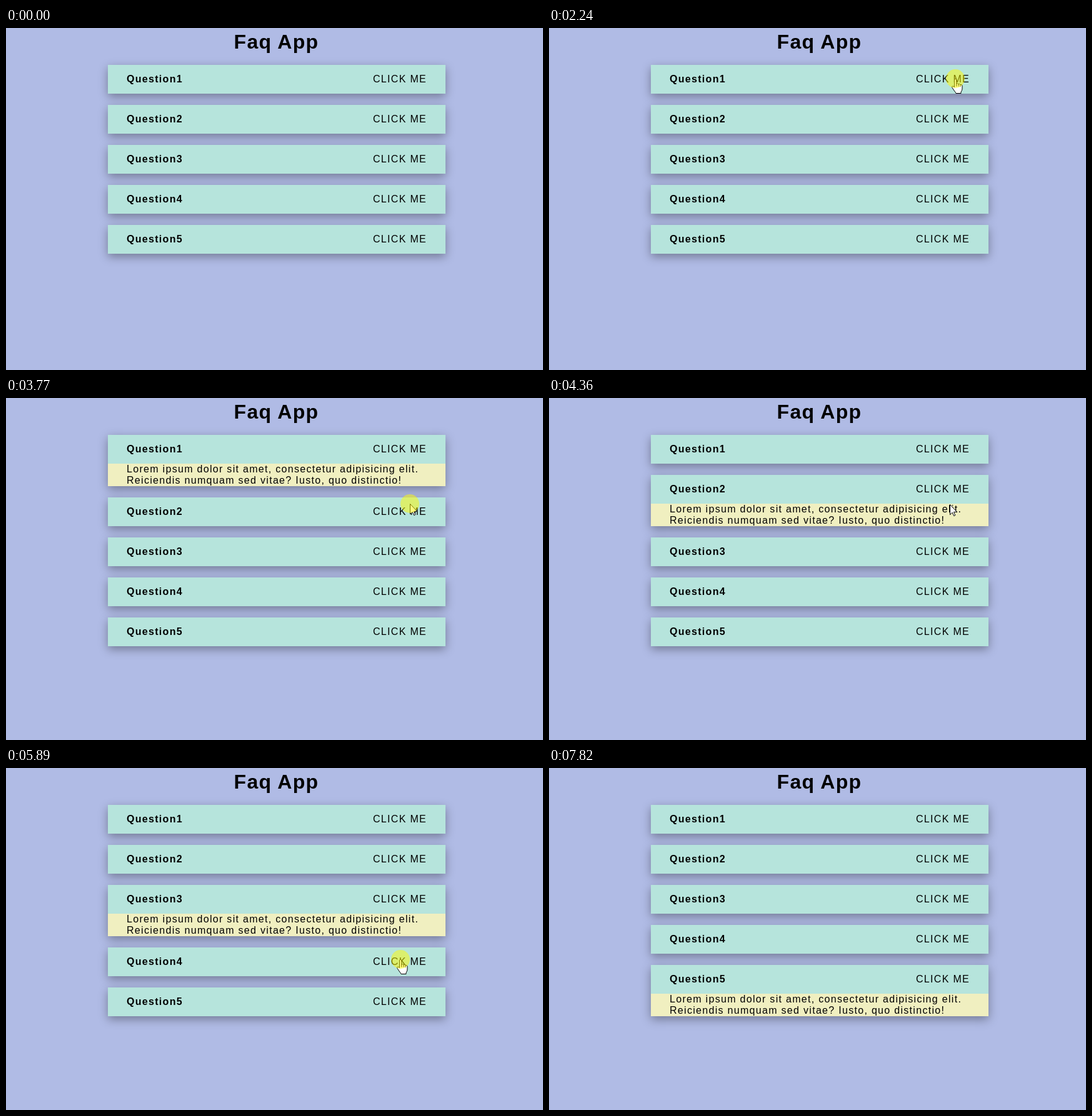
Recreate the animation shown at these times as an HTML page. Size 859 by 547 pixels, loop 8000 ms.

```html
<!DOCTYPE html>
<html lang="en">
<head>
<meta charset="utf-8">
<title>Faq App</title>
<style>
html, body { margin: 0; width: 100%; height: 100%; overflow: hidden; }
body {
  position: relative;
  background: #b0bbe5;
  color: #000;
  font: 16px/18px "Liberation Sans", Arial, sans-serif;
  letter-spacing: 1.3px;
}
main { position: absolute; left: 163px; top: 4px; width: 540px; }
h1 { margin: 0 1px 18px 0; font-size: 32px; line-height: 37px; text-align: center; }
section { margin-bottom: 18px; background: #b6e4dc; box-shadow: 0 5px 15px rgba(0, 0, 0, .35); }
header { display: flex; justify-content: space-between; padding: 14px 30px; }
p { display: none; margin: 0; padding: 0 30px; background: #f0efc0; white-space: nowrap; }
.open p { display: block; }
svg { position: absolute; left: 0; top: 0; width: 100%; height: 100%; }
svg path { fill: #fff; stroke: #000; stroke-linejoin: round; }
</style>
</head>
<body>
<main><h1>Faq App</h1></main>
<svg>
  <g id="cursor">
    <path id="arrow" d="M.5.5V16.7L4.2 13.2 6.7 18.6 8.9 17.6 6.5 12.3H11.6z"/>
    <path id="hand" d="M-1.5 13.5V2a1.6 1.6 0 0 1 3.2 0V8q2-1 3.2.7 2-.8 3 .8 2.6-.5 3.1 1.6V16q0 3-2 5.2V23.5H1q-.8-2-3-4.5L-5 14.5q-1-2 .5-2.5 1.3-.3 3 1.5M1.7 8v4.5M4.9 8.7v3.8M7.9 9.5v3.3"/>
    <circle id="press" r="15" fill="rgba(255,250,0,.5)"/>
  </g>
</svg>
<script>
const LOOP = 8000, TICK = 66.5, START = 390, HOLD = 135;
const $ = id => document.getElementById(id);

// each move: start time, end time, Bézier control points
const moves = [
  [START, 1190, [799, 528], [690, 60], [300, -120], [245, 82]],
  [1190, 2110, [245, 82], [287, 167], [650, 81]],
  [3310, 3570, [650, 81], [646, 169]],
  [3900, 4440, [646, 169], [640, 170]],
  [4570, 4820, [640, 170], [632, 250]],
  [5360, 5700, [632, 250], [631, 306]],
  [6030, 6410, [631, 306], [627, 378]],
  [6960, 7490, [627, 378], [760, 150], [223, -8]]
];
const visible = t => (t >= START && t < 7420) || (t >= 7750 && t < 7820);

// opening clicks, one per question, plus one that only presses
const clicks = [2240, 3770, 5100, 5830, 6690];
const presses = [...clicks, 2970];

const cards = clicks.map((_, i) => {
  const card = document.createElement("section");
  card.innerHTML = `<header><b>Question${i + 1}</b><span>CLICK ME</span></header>
    <p>Lorem ipsum dolor sit amet, consectetur adipisicing elit.<br>
    Reiciendis numquam sed vitae? Iusto, quo distinctio!</p>`;
  document.querySelector("main").append(card);
  return card;
});

const show = (id, on) => { $(id).style.display = on ? "" : "none"; };
const mix = (a, b, u) => a.map((v, i) => v + (b[i] - v) * u);

function bezier(points, u) {
  if (points.length === 1) return points[0];
  return bezier(points.slice(1).map((p, i) => mix(points[i], p, u)), u);
}

function position(t) {
  const move = moves.findLast(m => m[0] <= t) || moves[0];
  const [from, to, ...points] = move;
  let u = Math.min(1, Math.max(0, (t - from) / (to - from)));
  if (move === moves[0]) u = 1 - (1 - u) ** 2; // the entrance slows down
  return bezier(points, u).map(Math.round);
}

function draw(t) {
  const current = clicks.filter(c => t >= c + HOLD).length - 1;
  cards.forEach((card, i) => card.classList.toggle("open", i === current));

  const [x, y] = position(START + Math.floor((t - START + 20) / TICK) * TICK);
  const overButton = x > 586 && x < 673 && cards.some((_, i) => {
    const top = 59 + 64 * i + (current >= 0 && i > current ? 36 : 0);
    return y >= top + 12 && y < top + 34;
  });
  $("cursor").setAttribute("transform", `translate(${x} ${y})`);
  show("cursor", visible(t));
  show("hand", overButton);
  show("arrow", !overButton);
  show("press", presses.some(p => t >= p && t < p + HOLD));
}

function frame() {
  draw(performance.now() % LOOP);
  requestAnimationFrame(frame);
}
frame();
</script>
</body>
</html>
```
